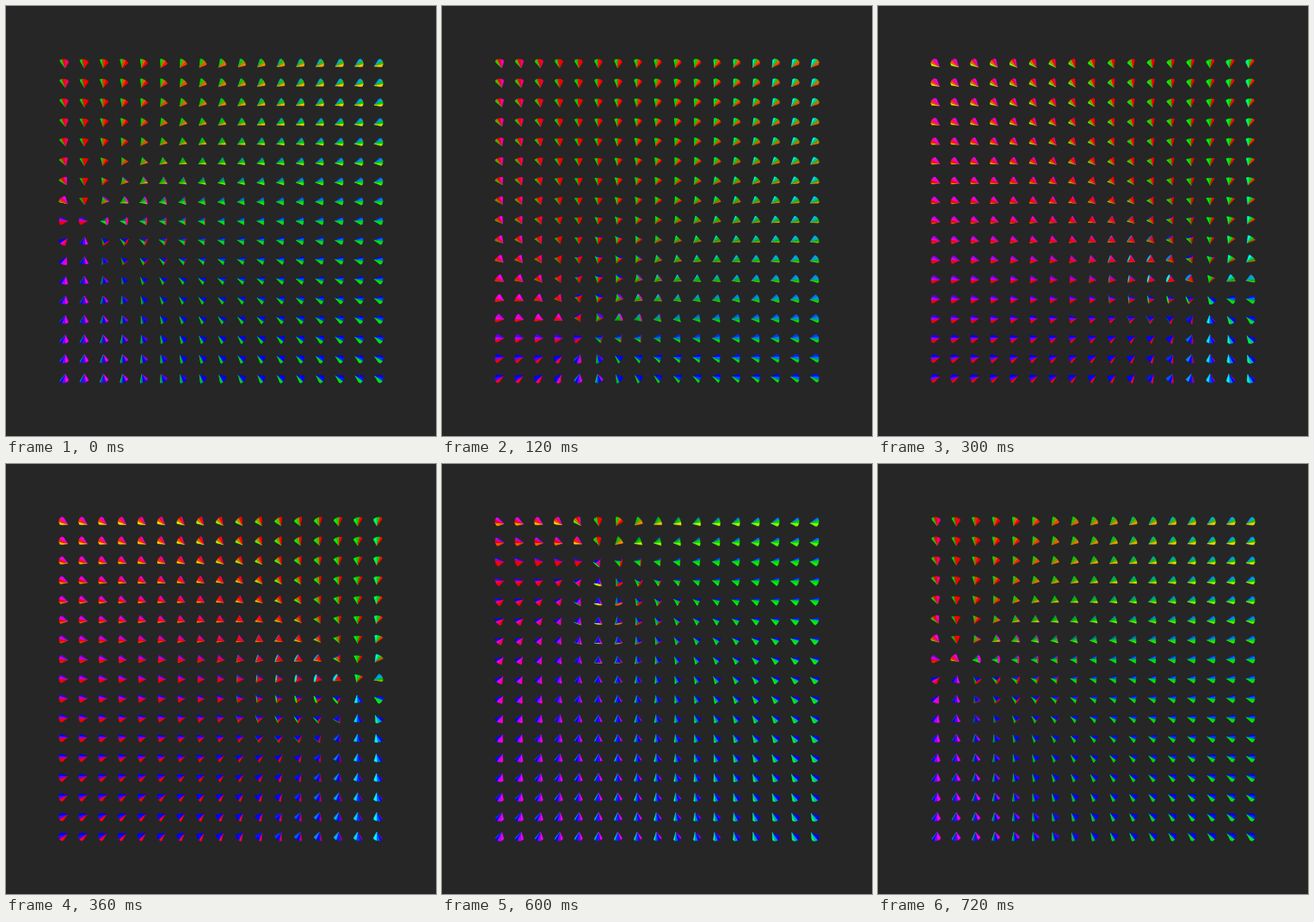
An HTML page with a canvas for the animation above (0.75 s loop, 500 by 500 pixels).

```html
<!DOCTYPE html>
<html lang="en">
<head>
<meta charset="utf-8">
<title>Cones following an orbiting point</title>
<style>
html, body { margin: 0; width: 100%; height: 100%; overflow: hidden; background: #262626; }
canvas { display: block; }
</style>
</head>
<body>
<canvas id="stage" width="500" height="500"></canvas>
<script>
const ctx = document.getElementById('stage').getContext('2d');

const STEP_MS = 30, STEPS = 25;
const STEP_ANGLE = 14.7 * Math.PI / 180;
const ORBIT = 156;
const COUNT = 17, SPACING = 22.72;
const SIDES = 8, HALF_LENGTH = 3.9, RADIUS = 4.6;
const CAMERA_Z = 250 / Math.tan(37.5 * Math.PI / 180);

// Red, green and blue lights, relative to the stage centre.
const LIGHTS = [
  { x: 1300, y: 700, gain: 2.2 },
  { x: -1300, y: 700, gain: 1.45 },
  { x: 0, y: -420, gain: 2.2 }
];

const slant = Math.hypot(2 * HALF_LENGTH, RADIUS);
const tilt = RADIUS / slant;
const spread = 2 * HALF_LENGTH / slant;

function shade(x, y, nx, ny) {
  const channels = LIGHTS.map(light => {
    const dx = light.x - x, dy = light.y - y;
    const lambert = (nx * dx + ny * dy) / Math.hypot(dx, dy);
    return Math.round(255 * Math.min(1, Math.max(0, lambert * light.gain)));
  });
  return `rgb(${channels})`;
}

function project(x, y, z) {
  const scale = CAMERA_Z / (CAMERA_Z - z);
  return [x * scale, y * scale];
}

function fillPolygon(points, color) {
  ctx.beginPath();
  points.forEach(p => ctx.lineTo(p[0], p[1]));
  ctx.closePath();
  ctx.fillStyle = ctx.strokeStyle = color;
  ctx.fill();
  ctx.stroke();
}

function drawCone(x, y, heading) {
  const ax = Math.cos(heading), ay = Math.sin(heading);
  const baseX = x - ax * HALF_LENGTH, baseY = y - ay * HALF_LENGTH;
  const tipX = x + ax * HALF_LENGTH, tipY = y + ay * HALF_LENGTH;
  const facesCamera = (px, py, nx, ny, nz) => nz * CAMERA_Z - nx * px - ny * py > 0;
  const rim = angle => {
    const side = RADIUS * Math.cos(angle);
    return project(baseX - ay * side, baseY + ax * side, RADIUS * Math.sin(angle));
  };
  const apex = project(tipX, tipY, 0);
  const ring = Array.from({ length: SIDES }, (_, i) => rim(i * 2 * Math.PI / SIDES));

  if (facesCamera(baseX, baseY, -ax, -ay, 0)) fillPolygon(ring, shade(x, y, -ax, -ay));

  for (let i = 0; i < SIDES; i++) {
    const middle = (i + 0.5) * 2 * Math.PI / SIDES;
    const side = spread * Math.cos(middle);
    const nx = ax * tilt - ay * side, ny = ay * tilt + ax * side;
    if (!facesCamera(tipX, tipY, nx, ny, spread * Math.sin(middle))) continue;
    fillPolygon([apex, ring[i], ring[(i + 1) % SIDES]], shade(x, y, nx, ny));
  }
}

function draw(step) {
  const angle = Math.PI - step * STEP_ANGLE;
  const targetX = ORBIT * Math.cos(angle), targetY = ORBIT * Math.sin(angle);
  ctx.setTransform(1, 0, 0, 1, 0, 0);
  ctx.fillStyle = '#262626';
  ctx.fillRect(0, 0, 500, 500);
  ctx.translate(250, 250);
  ctx.lineWidth = 0.25;
  for (let row = 0; row < COUNT; row++) {
    for (let col = 0; col < COUNT; col++) {
      const x = (col - (COUNT - 1) / 2) * SPACING;
      const y = (row - (COUNT - 1) / 2) * SPACING;
      drawCone(x, y, Math.atan2(targetY - y, targetX - x));
    }
  }
}

const start = performance.now();
let shown = -1;

function tick() {
  const step = Math.floor((performance.now() - start) / STEP_MS) % STEPS;
  if (step !== shown) draw(shown = step);
  requestAnimationFrame(tick);
}
tick();
</script>
</body>
</html>
```
